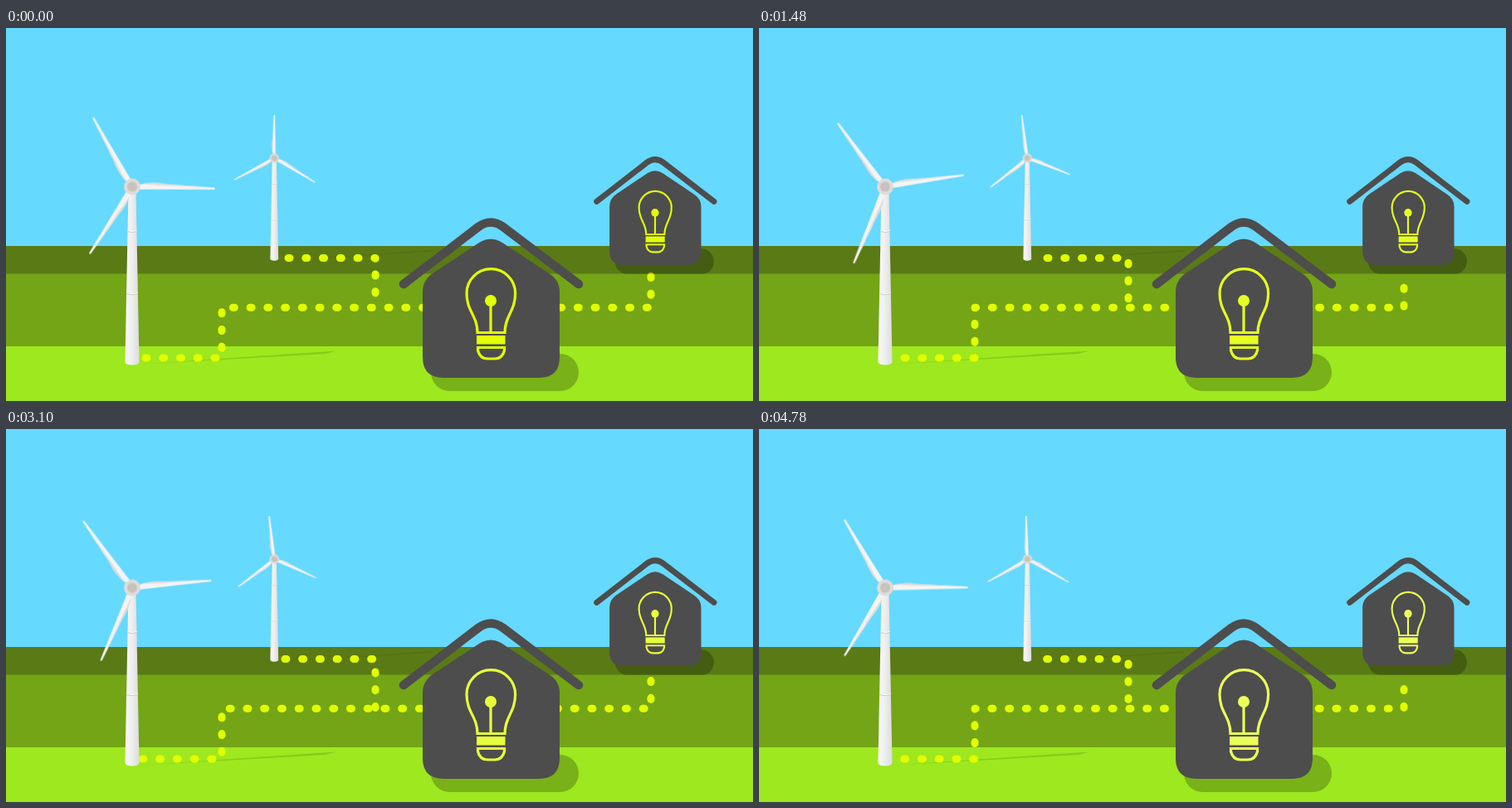
Recreate the animation shown at these times as an HTML page without scripts. Size 900 by 450 pixels, loop 4.8 s.

```html
<!DOCTYPE html>
<html lang="en">
<head>
<meta charset="utf-8">
<title>Wind power</title>
<style>
html, body { margin: 0; width: 100%; height: 100%; overflow: hidden; }
svg { display: block; width: 100vw; height: 100vh; }
.rotor { animation: spin 4.8s linear infinite; }
.cable {
  fill: none; stroke: #e1ff00; stroke-width: 9; stroke-linecap: round; stroke-linejoin: round;
  stroke-dasharray: 2 18.75; animation: flow 4.8s linear infinite;
}
.bulb { color: #e1ff00; animation: glow 4.8s linear infinite; }
@keyframes spin { to { transform: rotate(360deg); } }
@keyframes flow { from { stroke-dashoffset: var(--from); } to { stroke-dashoffset: calc(var(--from) - 90px); } }
@keyframes glow { 50% { color: #fff; } }
</style>
</head>
<body>
<svg viewBox="0 0 900 450" preserveAspectRatio="none">
  <defs>
    <linearGradient id="steel">
      <stop offset="0" stop-color="#fafafa"/>
      <stop offset=".5" stop-color="#efeeee"/>
      <stop offset="1" stop-color="#dddbdb"/>
    </linearGradient>
    <clipPath id="nearTop"><path d="M0 100H300V450H0z"/></clipPath>
    <clipPath id="farTop"><path d="M200 105H450V450H200z"/></clipPath>

    <g id="blade">
      <path fill="#f5f4f4" d="M8-2.5C20-6.5 32-5.5 40-4.2L99-1.2Q101 0 99 1L8 3z"/>
      <path fill="#dedcdc" d="M12-3.6C22-6.3 32-5.5 40-4.2L99-1.2 40-2.4Q24-3 12-3.6z"/>
    </g>
    <g id="blades">
      <use href="#blade"/>
      <use href="#blade" transform="rotate(121) scale(.96)"/>
      <use href="#blade" transform="rotate(239.3) scale(.96)"/>
    </g>
    <g id="tower">
      <path fill="url(#steel)" d="M-4.5 6H4.5L8.5 211Q8.500 215 0 215T-8.500 211z"/>
      <path fill="none" stroke="#fff" stroke-width="1.200" d="M-5.500 53Q0 55 5.500 53M-7 128Q0 130.500 7 128"/>
      <path fill="none" stroke="#c6c4c4" stroke-width=".9" d="M-5.500 54Q0 56 5.500 54M-7 129Q0 131.500 7 129"/>
    </g>
    <g id="hub">
      <circle r="10" fill="#dedcda"/>
      <circle r="6" fill="#c8c3bc"/>
    </g>

    <!-- Origin: middle of the ground line -->
    <g id="house">
      <rect x="-72" y="-29" width="178" height="45" rx="22.500" opacity=".24"/>
      <g fill="#4d4d4d">
        <path d="M-14-163Q0-172 14-163L70-126Q83-118 83-104V-25Q83 0 58 0H-57Q-82 0-82-25V-104Q-82-118-70-126z"/>
        <path fill="none" stroke="#4d4d4d" stroke-width="10.500" stroke-linecap="round" d="M-105-113L-15-182Q0-193 15-182L106-113"/>
      </g>
      <g class="bulb" fill="none" stroke="currentColor" stroke-width="3.200">
        <path d="M-16-54.500C-16-75-29-80-29-102A29.300 29.300 0 0 1 29.600-102C29.600-80 17-75 17-54.500z"/>
        <path d="M0-93V-55M-15.500-36.500H16.500V-33Q14-23 5-23H-4Q-13-23-15.500-33z"/>
        <g fill="currentColor" stroke="none">
          <circle cy="-93" r="7"/>
          <path d="M-17-51H17.500V-40.500H-17z"/>
        </g>
      </g>
    </g>
  </defs>

  <path fill="#66d9ff" d="M0 0H900V263H0z"/>
  <path fill="#5a7a16" d="M0 263H900V297H0z"/>
  <path fill="#73a516" d="M0 296.500H900V385H0z"/>
  <path fill="#9de81f" d="M0 384H900V450H0z"/>
  <path opacity=".13" d="M155 406L398 389.500 385 393z"/>
  <path opacity=".08" d="M325 281L515 268 510 270z"/>

  <path class="cable" style="--from:-4px" d="M164 398H260V337.300H777V297"/>
  <path class="cable" style="--from:-10px" d="M330 277.500H445V337"/>

  <g clip-path="url(#farTop)">
    <g transform="translate(323.300 157) scale(.575)">
      <use href="#tower"/>
      <g transform="rotate(30.700)"><g class="rotor"><use href="#blades"/></g></g>
      <use href="#hub"/>
    </g>
  </g>
  <g clip-path="url(#nearTop)">
    <g transform="translate(152 191.500)">
      <use href="#tower"/>
      <g transform="rotate(1.300)"><g class="rotor"><use href="#blades"/></g></g>
      <use href="#hub"/>
    </g>
  </g>

  <use href="#house" transform="translate(782 286) scale(.669 .679)"/>
  <use href="#house" transform="translate(584 422)"/>
</svg>
</body>
</html>
```
